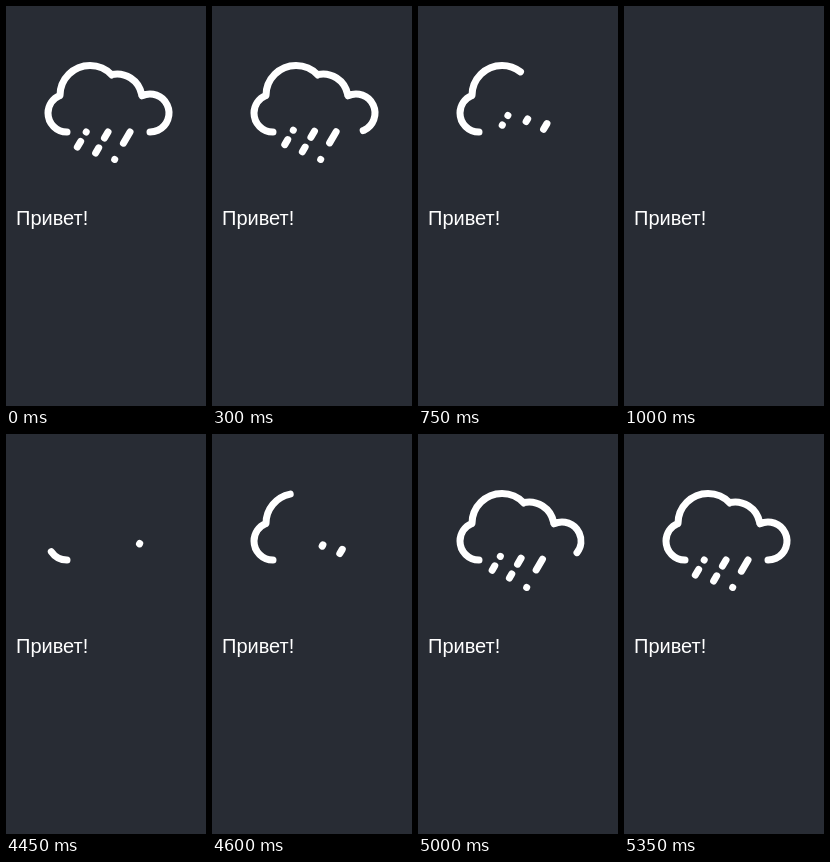
Recreate the animation shown at these times as an HTML page with a canvas. Size 200x400 px, loop 8 s.

```html
<!DOCTYPE html>
<html lang="ru">
<head>
<meta charset="utf-8">
<style>
  html, body { margin: 0; width: 100%; height: 100%; overflow: hidden; background: #282c34; }
  canvas { position: absolute; left: 0; top: 0; }
  p { position: absolute; left: 10px; top: 201px; margin: 0; color: #fff;
      font: 20px/23px "Liberation Sans", Arial, sans-serif; }
</style>
</head>
<body>
<canvas id="sky" width="200" height="400"></canvas>
<p>Привет!</p>
<script>
const ctx = document.getElementById('sky').getContext('2d');
ctx.strokeStyle = '#fff';
ctx.lineWidth = 7;
ctx.lineCap = 'round';
ctx.lineJoin = 'round';

const LOOP = 8000, STEP = 50;
const RAIN_TOP = 109, DX = -0.507, DY = 0.862;

// x, y, radius, start and end angle in degrees
const ARCS = [
  [61, 107, 19, 90, 248],
  [84, 89.5, 30, 180, 317],
  [111, 93, 25, 258, 351],
  [144, 107, 19, 245, 450]
];
const rad = deg => deg * Math.PI / 180;
const cloudLength = ARCS.reduce((sum, [, , r, a, b]) => sum + r * rad(b - a), 0);

// cubic-bezier(.25, .1, .25, 1)
function ease(x) {
  if (x <= 0) return 0;
  if (x >= 1) return 1;
  const curve = (s, a, b) => 3 * (1 - s) ** 2 * s * a + 3 * (1 - s) * s * s * b + s ** 3;
  let lo = 0, hi = 1;
  for (let i = 0; i < 25; i++) {
    const mid = (lo + hi) / 2;
    if (curve(mid, .25, .25) < x) lo = mid; else hi = mid;
  }
  return curve(lo, .1, 1);
}

function drawCloud(part) {
  let left = part * cloudLength;
  ctx.beginPath();
  for (const [x, y, r, a, b] of ARCS) {
    const sweep = Math.min(rad(b - a), left / r);
    if (sweep <= 0) break;
    ctx.arc(x, y, r, rad(a), rad(a) + sweep);
    left -= sweep * r;
  }
  ctx.stroke();
}

// A dash on the slanted line that starts at (x, RAIN_TOP)
function dash(x, from, length) {
  const to = from + Math.max(length, 0.01);
  ctx.beginPath();
  ctx.moveTo(x + from * DX, RAIN_TOP + from * DY);
  ctx.lineTo(x + to * DX, RAIN_TOP + to * DY);
  ctx.stroke();
}

function drawRain(w) {
  const grow = delay => ease((w - 12 - delay) / 800);
  const right = grow(0), middle = grow(100), left = grow(200);
  const start = 19.7;

  if (right > 0) {
    dash(134, start * right, 13 * right);
    if (right > 0.95) dash(134.8, 51.5, 0);
  }
  if (middle > 0) {
    const total = 13 * middle;
    dash(112, start * middle, Math.min(7, total));
    if (total > 7) dash(112, start * middle + 18.4, total - 7);
  }
  if (left > 0) {
    dash(90.2, start * left, 0);
    dash(90.2, start * left + 11, 6.5 * left);
  }
}

// Time into the drawing; the erasing runs it backwards
function drawTime(t) {
  const w = t < 2000 ? 1000 - t : t - 4400;
  return w >= 950 ? Infinity : w;
}

function frame(now) {
  const w = drawTime(Math.floor(now % LOOP / STEP) * STEP);
  ctx.clearRect(0, 0, 200, 400);
  if (w > 0) {
    drawCloud(ease((w + 35) / 950));
    drawRain(w);
  }
  requestAnimationFrame(time => frame(time - begin));
}
const begin = performance.now();
frame(0);
</script>
</body>
</html>
```
